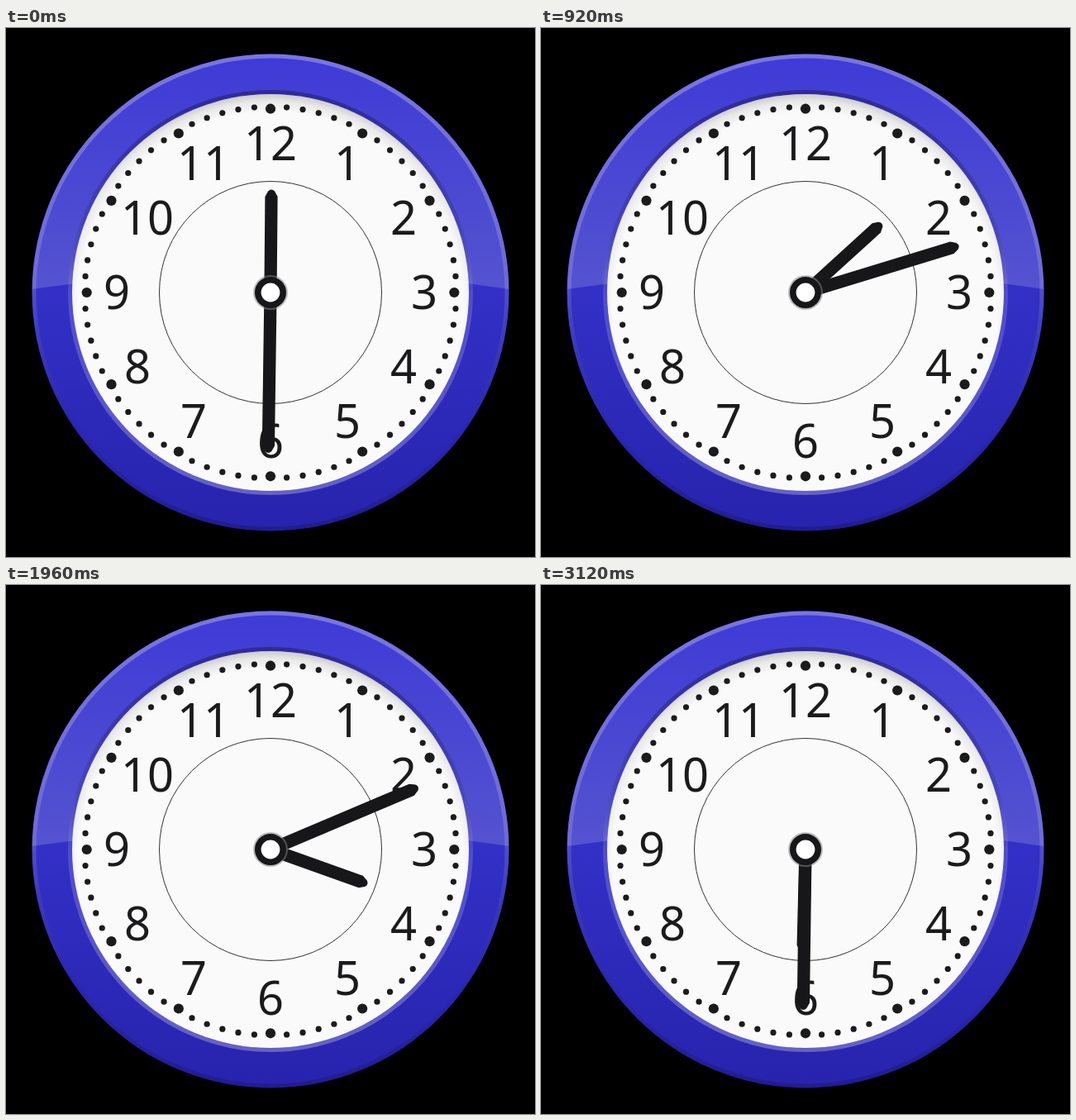
Write an HTML page that moves like this. It is 640 px wide and 640 px high and loops after 3240 ms.

```html
<!DOCTYPE html>
<html lang="en">
<head>
<meta charset="utf-8">
<title>Clock</title>
<style>
  html, body { margin: 0; width: 100%; height: 100%; overflow: hidden; background: #000; }
  svg { display: block; width: 100vw; height: 100vh; }
  text { font: 56px "Noto Sans", "Open Sans", sans-serif; text-anchor: middle; }
</style>
</head>
<body>
<svg viewBox="0 0 640 640">
  <defs>
    <linearGradient id="bezel" x2="0" y2="1">
      <stop stop-color="#3b37d6"/>
      <stop offset=".5" stop-color="#3230c6"/>
      <stop offset="1" stop-color="#2723ad"/>
    </linearGradient>
    <linearGradient id="gloss" x2="0" y2="1">
      <stop stop-color="#fff" stop-opacity="0"/>
      <stop offset="1" stop-color="#fff" stop-opacity=".17"/>
    </linearGradient>
    <linearGradient id="outerRim" x2="0" y2="1">
      <stop stop-color="#fff" stop-opacity=".3"/>
      <stop offset=".5" stop-color="#fff" stop-opacity=".14"/>
      <stop offset=".8" stop-color="#000" stop-opacity=".04"/>
      <stop offset="1" stop-color="#000" stop-opacity=".17"/>
    </linearGradient>
    <linearGradient id="innerRim" x2="0" y2="1">
      <stop stop-color="#000" stop-opacity=".3"/>
      <stop offset=".35" stop-color="#000" stop-opacity=".1"/>
      <stop offset=".5" stop-color="#fff" stop-opacity=".14"/>
      <stop offset="1" stop-color="#fff" stop-opacity=".28"/>
    </linearGradient>
    <radialGradient id="shade" gradientUnits="userSpaceOnUse" cx="320" cy="335" r="262">
      <stop offset=".89" stop-color="#000" stop-opacity="0"/>
      <stop offset=".94" stop-color="#000" stop-opacity=".07"/>
      <stop offset="1" stop-color="#000" stop-opacity=".28"/>
    </radialGradient>
    <clipPath id="disc"><circle cx="320" cy="320" r="288.5"/></clipPath>
  </defs>

  <circle cx="320" cy="320" r="288.5" fill="url(#bezel)"/>
  <path d="M31 316Q320 273 609 316V0H31Z" fill="url(#gloss)" clip-path="url(#disc)"/>
  <circle cx="320" cy="320" r="286" fill="none" stroke="url(#outerRim)" stroke-width="5"/>
  <circle cx="320" cy="320" r="242.5" fill="none" stroke="url(#innerRim)" stroke-width="5"/>
  <circle cx="320" cy="320" r="240" fill="#fafafa"/>
  <circle cx="320" cy="320" r="240" fill="url(#shade)"/>
  <g id="dial" fill="#1b1b1d"></g>
  <circle cx="320" cy="320" r="134.5" fill="none" stroke="#333" stroke-width="1"/>
  <g fill="#17171a">
    <path id="hour"/>
    <path id="minute"/>
  </g>
  <circle cx="320" cy="320" r="21" fill="#888" opacity=".55"/>
  <circle cx="320" cy="320" r="15.2" fill="#fff" stroke="#17171a" stroke-width="7.6"/>
</svg>
<script>
const LOOP = 3240, STEP = 40;
const REST = 180.8;   // minute hand angle between turns
const HOUR_START = 0.5;

// one full minute turn each: start ms, end ms, hour angle reached, ease-in skew
const turns = [
  [10, 520, 25.6, 1],
  [646, 1080, 57.2, 1],
  [1184.5, 1604.5, 90.5, 1],
  [1699, 2120, 118.5, 1],
  [2255, 2640, 156, 1.227],
  [2765, 3120, 181.4, 1]
];

const get = id => document.getElementById(id);

function add(tag, attrs, text = "") {
  const el = document.createElementNS("http://www.w3.org/2000/svg", tag);
  for (const key in attrs) el.setAttribute(key, attrs[key]);
  el.textContent = text;
  get("dial").append(el);
}

// a dot every 5 degrees, a large one with a numeral every 30
for (let i = 0; i < 72; i++) {
  const a = i * Math.PI / 36, major = i % 6 === 0, r = major ? 222.3 : 224.8;
  const sin = Math.sin(a), cos = Math.cos(a);
  add("circle", { cx: 320 + r * sin, cy: 320 - r * cos, r: major ? 6.1 : 3.6 });
  if (major) {
    const n = i / 6 || 12;
    const shift = n === 10 || n === 11 ? 12 : 0;
    add("text", { x: 320 + 186 * sin + shift, y: 340 - 180.3 * cos }, n);
  }
}

const handPath = len =>
  `M-7.6 0V${9 - len}L-4 ${2.5 - len}Q0 ${-1.5 - len} 4 ${2.5 - len}L7.6 ${9 - len}V0Z`;
get("hour").setAttribute("d", handPath(125));
get("minute").setAttribute("d", handPath(194.5));

const turnTo = (id, angle) =>
  get(id).setAttribute("transform", `translate(320 320) rotate(${angle})`);

function draw(now) {
  const t = Math.floor(now % LOOP / STEP) * STEP;
  let hour = HOUR_START, minute = REST;
  for (const [start, end, reached, skew] of turns) {
    const u = Math.min(1, Math.max(0, (t - start) / (end - start)));
    const p = (1 - Math.cos(Math.PI * u ** skew)) / 2;
    hour += (reached - hour) * p;
    minute += 360 * p;
  }
  turnTo("hour", hour);
  turnTo("minute", minute);
}

const origin = performance.now();
function frame() {
  draw(performance.now() - origin);
  requestAnimationFrame(frame);
}
frame();
</script>
</body>
</html>
```
